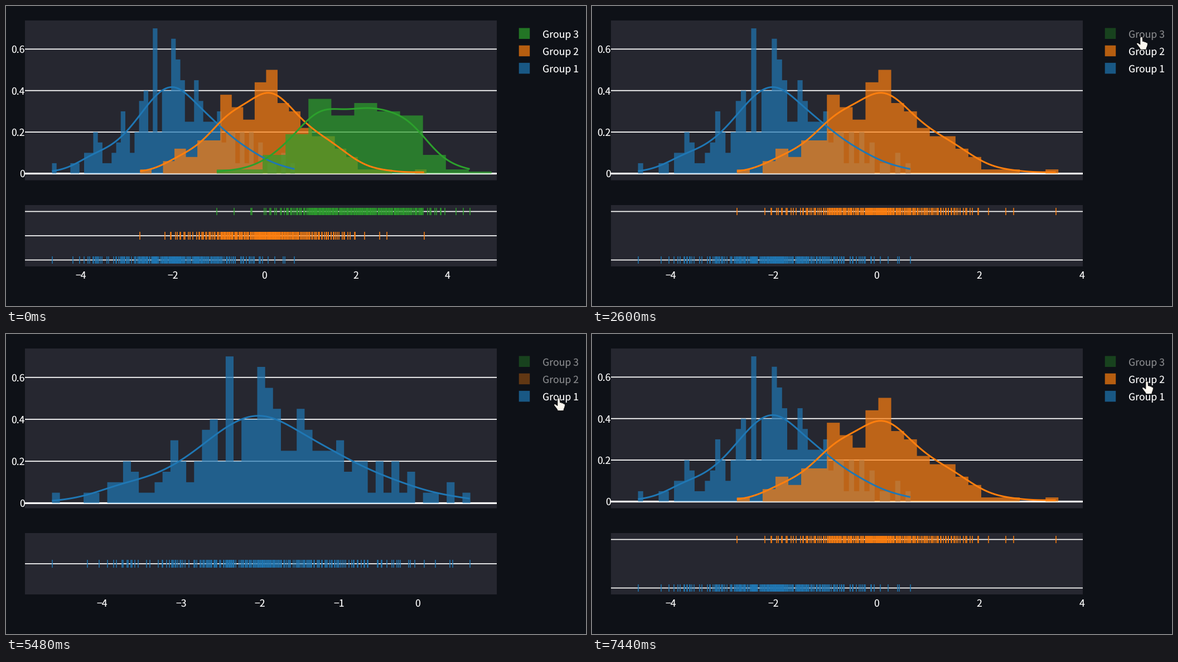
These frames come from a looping animation (1040 px wide and 538 px high, 8000 ms). A matplotlib script:

```python
import numpy as np
import matplotlib
import matplotlib.pyplot as plt
from matplotlib.animation import FuncAnimation
from matplotlib.patches import PathPatch, Rectangle
from matplotlib.path import Path

matplotlib.rcParams["font.family"] = ["Noto Sans CJK JP", "DejaVu Sans"]
matplotlib.rcParams["text.hinting"] = "none"
matplotlib.rcParams["text.hinting_factor"] = 1

W, H, DPI = 1040, 538, 100
LOOP, STEP = 8000, 20
PT = 72 / DPI                      # points per pixel
BG, PANEL, INK = "#0e1117", "#262730", "#fafafa"
LEFT, RIGHT = 34, 880
FIRST_X, LAST_X = 82.5, 831.5      # pixels of the smallest and largest value
COLORS = {1: "#1f77b4", 2: "#ff7f0e", 3: "#2ca02c"}


class Group:
    """200 values spread inside histogram bins of known counts."""

    def __init__(self, low, high, size, counts):
        rng = np.random.default_rng(4)
        self.low, self.high = low, high
        self.edges = low + size * np.arange(len(counts) + 1)
        self.heights = np.array(counts) / (sum(counts) * size)
        vals = [low + size * (k + (np.arange(n) + rng.random(n)) / max(n, 1))
                for k, n in enumerate(counts)]
        self.values = np.clip(np.concatenate(vals), low, high)
        self.values[[0, -1]] = low, high

    def density(self, n=120):
        """Gaussian kernel estimate with Scott's bandwidth."""
        v = self.values
        bw = v.std(ddof=1) * len(v) ** -0.2
        x = np.linspace(self.low, self.high, n)
        z = (x[:, None] - v) / bw
        return x, np.exp(-z * z / 2).mean(axis=1) / (bw * np.sqrt(2 * np.pi))


GROUPS = {
    1: Group(-4.635, 0.657, 0.1,
             [1, 0, 0, 0, 1, 1, 0, 2, 2, 4, 3, 1, 1, 2, 3, 6, 4, 2, 4, 7,
              8, 4, 14, 4, 8, 8, 13, 11, 9, 5, 5, 9, 7, 5, 5, 5, 6, 3, 4,
              4, 1, 4, 1, 4, 1, 3, 0, 1, 1, 0, 2, 0, 1]),
    2: Group(-2.713, 3.485, 0.25,
             [1, 0, 3, 6, 4, 8, 8, 19, 16, 13, 22, 25, 17, 15, 11, 9, 9,
              6, 4, 1, 1, 1, 0, 0, 1]),
    3: Group(-1.04, 4.48, 0.5,
             [2, 2, 9, 19, 36, 28, 34, 30, 28, 9, 2, 1]),
}

# (start ms, highest group the axes are fitted to, number of groups shown)
SCENES = [(0, 3, 3), (2600, 2, 2), (4680, 1, 1),
          (5580, 1, 0), (6680, 1, 1), (7440, 2, 2)]

# Pointer strokes: first and last step in ms, steps, end point, bend
POINTER_START = (1051, 59)
STROKES = [
    (1410, 1620, 3, (989, 63), (0, 0)),
    (1830, 2170, 4, (985, 55.5), (-22, -47)),
    (3700, 4020, 4, (988, 81), (0, 0)),
    (4350, 4470, 2, (995, 115), (0, 0)),
    (4920, 5260, 4, (991, 115), (-28, -40)),
    (5920, 6140, 3, (950, 101), (0, 0)),
    (6350, 6350, 1, (991, 99), (0, 0)),
    (6470, 6680, 3, (984, 64), (0, 0)),
    (6900, 7000, 2, (1001, 77), (0, 0)),
    (7440, 7440, 1, (995, 85), (0, 0)),
]

fig = plt.figure(figsize=(W / DPI, H / DPI), dpi=DPI, facecolor=BG)
ax = fig.add_axes([0, 0, 1, 1])
ax.set(xlim=(0, W), ylim=(H, 0))
ax.axis("off")


def rect(x, y, w, h, color, **kw):
    return ax.add_patch(Rectangle((x, y), w, h, fc=color, lw=0, snap=False,
                                  **kw))


def rule(y, thick):
    return rect(LEFT, y - thick / 2, RIGHT - LEFT, thick, "white", zorder=1)


def label(x, y, s, ha="left", **kw):
    return ax.text(x, y, s, ha=ha, va="baseline", fontsize=17.6 * PT,
                   color=INK, **kw)


def scales(fit):
    """Functions from data to pixels, fitted to groups 1..fit."""
    low, high = GROUPS[1].low, GROUPS[fit].high
    sx = (LAST_X - FIRST_X) / (high - low)
    y0, sy = (303.4, 376) if fit == 1 else (300.5, 372)
    return (lambda v: FIRST_X + (v - low) * sx), (lambda v: y0 - v * sy)


def build_axes(fit):
    px, py = scales(fit)
    out = []
    for v in (0, 0.2, 0.4, 0.6):
        out.append(rule(py(v), 1.8 if v else 3.2))
        out.append(label(LEFT, py(v) + 6.7, f"{v:g}", "right"))
    for v in range(-6, 7, 1 if fit == 1 else 2):
        if LEFT < px(v) < RIGHT - 0.5:
            text = str(v).replace("-", "\u2212")
            out.append(label(px(v), 489, text, "center"))
    return out


def build_group(fit, key, row):
    g, color = GROUPS[key], COLORS[key]
    px, py = scales(fit)
    bars = ax.stairs(py(g.heights), px(g.edges), baseline=py(0), fill=True,
                     color=color, alpha=.7, lw=0, snap=False,
                     zorder=2 + key / 10)
    x, y = g.density()
    curve, = ax.plot(px(x), py(y), color=color, lw=3 * PT,
                     solid_capstyle="butt", zorder=3 + key / 10)
    rug = ax.vlines(px(g.values), row - 6.8, row + 6.8, color=color,
                    lw=1.5 * PT, zorder=2)
    return [bars, curve, rug, rule(row, 1.7)]


def build_legend(count):
    out = []
    for i, key in enumerate((3, 2, 1)):
        y = 39.5 + 31.2 * i
        dim = 1 if key <= count else .5
        out.append(rect(919.7, y, 19.5, 19.5, COLORS[key], alpha=.7 * dim))
        out.append(label(962, y + 17.3, f"Group {key}", alpha=dim))
    return out


def build_scene(fit, count):
    rows = np.linspace(455.5, 368.5, count) if count > 1 else [412]
    out = build_axes(fit) + build_legend(count)
    for key, row in zip(range(1, count + 1), rows):
        out += build_group(fit, key, row)
    return out


def hand_path():
    """Pointing hand with the finger tip at the origin."""
    start = (-2.2, 2)
    curves = [((-2.2, -.4), (0, -.4)), ((2.2, -.4), (2.2, 2)),
              ((2.2, 5), (2.6, 8)), ((5.3, 6.8), (5.8, 9)),
              ((8.4, 7.8), (8.8, 10.2)), ((11.2, 9.4), (11.4, 12)),
              ((11.5, 16), (9.6, 19)), ((9, 20.5), (9, 22.6)),
              ((3, 23), (-2, 22.6)), ((-2.2, 20.5), (-4, 18.5)),
              ((-6, 16), (-8.4, 12.8)), ((-9, 10.4), (-6.6, 10.6)),
              ((-4, 11.4), (-2.2, 13.6)), ((-2.2, 8), start)]
    verts = [start] + [p for c in curves for p in c]
    codes = [Path.MOVETO] + [Path.CURVE3] * (2 * len(curves))
    return np.array(verts), codes


def pointer(t):
    """Finger tip at time t: stepped quadratic curves, or None if hidden."""
    pos = None
    a = np.array(POINTER_START, float)
    for first, last, steps, end, bend in STROKES:
        if t < first:
            break
        b = np.array(end, float)
        mid = (a + b) / 2 + bend
        gap = (last - first) / max(steps - 1, 1) or 1
        u = min((t - first) // gap + 1, steps) / steps
        pos = (1 - u) ** 2 * a + 2 * u * (1 - u) * mid + u * u * b
        a = b
    return pos


rect(LEFT, 26, RIGHT - LEFT, 286.5, PANEL, zorder=0)
rect(LEFT, 357, RIGHT - LEFT, 110, PANEL, zorder=0)
scenes = {key: build_scene(*key) for key in {s[1:] for s in SCENES}}

HAND, CODES = hand_path()
hand = ax.add_patch(PathPatch(Path(HAND, CODES), fc="#fbf7ef", ec="#0a0a0c",
                              lw=1 * PT, zorder=9))


def update(i):
    t = i * STEP + STEP / 2
    now = [s[1:] for s in SCENES if s[0] <= t][-1]
    for key, artists in scenes.items():
        for a in artists:
            a.set_visible(key == now)
    tip = pointer(t)
    hand.set_visible(tip is not None)
    if tip is not None:
        hand.set_path(Path(HAND + tip, CODES))
    return []


anim = FuncAnimation(fig, update, frames=LOOP // STEP, interval=STEP,
                     init_func=lambda: update(0), repeat=True, repeat_delay=0)
plt.show()
```
